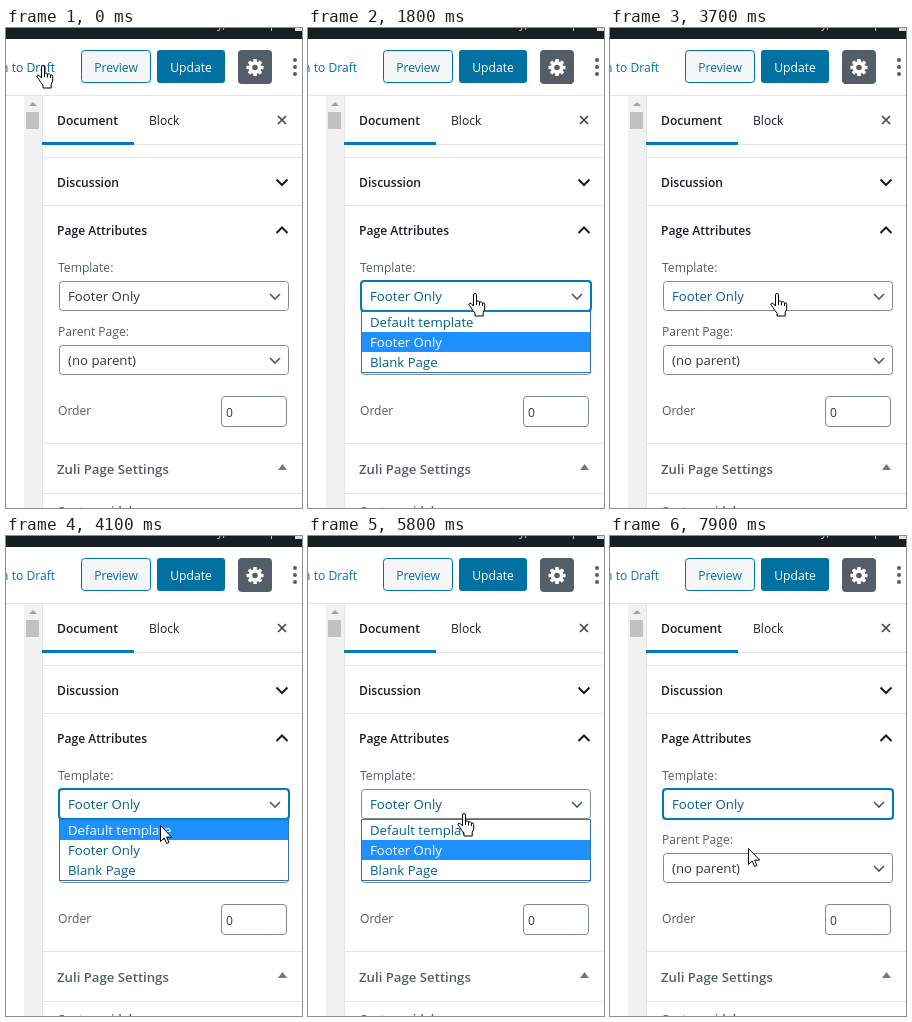
Write an HTML page that moves like this. It is 296 by 480 pixels and loops after 8 s.

```html
<!DOCTYPE html>
<html lang="en">
<head>
<meta charset="utf-8">
<title>Page settings panel</title>
<style>
  html, body { margin: 0; width: 100%; height: 100%; overflow: hidden; background: #fff; }
  svg { display: block; width: 296px; height: 480px; }
  text { font: 12.1px "Open Sans", "Noto Sans", sans-serif; fill: #191e23; white-space: pre; }
  .bold { font-weight: 600; }
  .big { font-size: 13.2px; }
  .label { fill: #555d66; }
  .value { fill: #32373c; }
  .field { fill: #fff; stroke: #7e8993; }
  .rule { stroke: #e2e4e7; }
  .chevron { fill: none; stroke: #191e23; stroke-width: 2; }
  .small { stroke: #555d66; stroke-width: 1.7; }
  .cursor { fill: #fff; stroke: #000; stroke-linejoin: round; }
</style>
</head>
<body>
<svg viewBox="0 0 296 480">
  <rect width="296" height="480" fill="#fff"/>

  <!-- header -->
  <rect width="296" height="11" fill="#191e23"/>
  <text x="211" y="0" style="fill:#ccc">y,</text>
  <text x="264" y="0" style="fill:#ccc">p</text>
  <rect x="289" width="7" height="3" fill="#ddd"/>
  <text id="draft" x="49" y="44" text-anchor="end">Switch to Draft</text>
  <rect x="75.5" y="22.5" width="69" height="32" rx="3" fill="#f3f5f6" stroke="#0071a1"/>
  <text x="110" y="44" text-anchor="middle" style="fill:#0071a1">Preview</text>
  <rect x="151" y="22" width="68" height="33" rx="3" fill="#0071a1"/>
  <text x="185" y="44" text-anchor="middle" style="fill:#fff">Update</text>
  <rect x="232" y="22" width="34" height="34" rx="4" fill="#555d66"/>
  <g id="gear" transform="translate(249 39.5)" fill="#fff"></g>
  <g fill="#555d66">
    <circle cx="289" cy="32" r="2"/><circle cx="289" cy="39" r="2"/><circle cx="289" cy="46" r="2"/>
  </g>

  <!-- page scrollbar -->
  <rect x="18" y="67" width="18" height="413" fill="#f1f1f1"/>
  <path d="M23 78l4-4 4 4z" fill="#a3a3a3"/>
  <rect x="20" y="84" width="13" height="17" fill="#c1c1c1"/>
  <path class="rule" d="M0 67.5H296M36.5 67V480M36 116.5H296M36 129.5H296M36 177.5H296M36 415.5H296M36 465.5H296"/>

  <!-- tabs -->
  <rect x="36" y="114" width="92" height="3" fill="#007cba"/>
  <text class="bold" x="51" y="97">Document</text>
  <text x="143" y="97">Block</text>
  <path d="M272 88l8 8m0-8l-8 8" stroke="#40464d" stroke-width="1.7"/>

  <!-- sections -->
  <text class="bold" x="51" y="159">Discussion</text>
  <path class="chevron" d="M270.5 151.5l5.5 5.5 5.5-5.5"/>
  <text class="bold" x="51" y="207">Page Attributes</text>
  <path class="chevron" d="M270.5 205l5.5-5.5 5.5 5.5"/>

  <text class="label" x="52" y="244">Template:</text>
  <rect id="select" x="53.5" y="253.5" width="229" height="29" rx="3" class="field"/>
  <rect id="ring" x="53" y="253" width="230" height="30" rx="3" fill="none" stroke="#007cba" stroke-width="2"/>
  <text id="choice" class="big" x="62" y="273">Footer Only</text>
  <path class="chevron small" d="M264 266l5 5 5-5"/>

  <text class="label" x="52" y="308">Parent Page:</text>
  <rect x="53.5" y="317.5" width="229" height="29" rx="3" class="field"/>
  <text class="big value" x="62" y="337">(no parent)</text>
  <path class="chevron small" d="M264 330l5 5 5-5"/>

  <text class="label" x="52" y="387">Order</text>
  <rect x="215.5" y="368.5" width="65" height="30" rx="3.5" class="field"/>
  <text class="value" x="220" y="389">0</text>

  <text class="bold big label" x="51" y="446">Zuli Page Settings</text>
  <path d="M272 442l4.5-6 4.5 6z" fill="#72777c"/>
  <text class="bold label" x="51" y="488">Custom sidebar</text>

  <g id="list">
    <rect x="53.5" y="283.5" width="229" height="61" fill="#fff" stroke="#2f74b5"/>
    <rect id="mark" x="54" width="228" height="20" fill="#1e90ff"/>
  </g>

  <g id="arrow" class="cursor">
    <path d="M.5 .5V16.5L4.2 13 6.7 18.5 9 17.5 6.6 12.1H11.7Z"/>
  </g>
  <g id="hand" class="cursor">
    <path d="M5.5 2a1.5 1.5 0 0 1 3 0V8.2q2.5-1 3 .8q2.3-.8 3 .8q2.2-.3 2.2 1.8V15q0 2-1.5 4V23H7V20Q4.5 17.5 3 14.5Q1 12 .8 11Q1.5 9.2 3.5 10.8L5.5 13Z"/>
    <path d="M8.5 8.2V12M11.5 9V12.5M14.5 10V13" fill="none"/>
  </g>
</svg>
<script>
const NS = 'http://www.w3.org/2000/svg';
const LOOP = 8000, STEP = 100;
const $ = id => document.getElementById(id);

function add(parent, tag, attrs, text = '') {
  const el = document.createElementNS(NS, tag);
  for (const name in attrs) el.setAttribute(name, attrs[name]);
  el.textContent = text;
  parent.append(el);
  return el;
}

for (let i = 0; i < 8; i++) {
  add($('gear'), 'rect', { x: -1.8, y: -8.5, width: 3.6, height: 4.5, rx: .6, transform: `rotate(${i * 45})` });
}
add($('gear'), 'circle', { r: 6.3 });
add($('gear'), 'circle', { r: 2.8, fill: '#555d66' });

const options = ['Default template', 'Footer Only', 'Blank Page'].map((name, i) =>
  add($('list'), 'text', { class: 'big', x: 62, y: 299 + i * 20 }, name));

// time, cursor, left, top, glide to the next key
const path = [
  [0, 'hand', 30, 37], [100, 'hand', 31, 41],
  [200, 'arrow', 38, 62, true], [900, 'arrow', 40, 266],
  [1000, 'hand', 85, 275], [1100, 'hand', 132, 278, true], [1500, 'hand', 160, 265],
  [4100, 'arrow', 154, 289], [4200, 'arrow', 142, 321], [4300, 'arrow', 134, 312],
  [4500, 'arrow', 137, 313],
  [5300, 'arrow', 141, 303], [5400, 'arrow', 149, 287], [5500, 'hand', 149, 277],
  [5900, 'hand', 150, 275],
  [6100, 'arrow', 149, 287], [6200, 'arrow', 139, 300], [6300, 'arrow', 134, 309],
  [6500, 'arrow', 128, 316], [6800, 'arrow', 137, 313],
  [7600, 'hand', 132, 321], [7700, 'hand', 132, 320], [7900, 'arrow', 138, 312],
];
const openSpans = [[1700, 3000], [3800, 4800], [5800, 6800]];
const pressSpans = [[3100, 3200], [3700, 3900], [5700, 5900]];
const focusAt = 1600;

const within = (t, spans) => spans.some(([a, b]) => t >= a && t < b);
const show = (el, on) => { el.style.display = on ? '' : 'none'; };

function cursorAt(t) {
  const i = path.findLastIndex(key => key[0] <= t);
  let [start, kind, x, y, glide] = path[i];
  if (glide) {
    const [end, , nx, ny] = path[i + 1];
    const u = (t - start) / (end - start), e = u * u * (3 - 2 * u);
    x += (nx - x) * e;
    y += (ny - y) * e;
  }
  return { kind, x: Math.round(x), y: Math.round(y) };
}

function draw(time) {
  const t = Math.floor(time % LOOP / STEP) * STEP;
  const { kind, x, y } = cursorAt(t);
  for (const name of ['arrow', 'hand']) {
    show($(name), name === kind);
    $(name).setAttribute('transform', `translate(${x} ${y})`);
  }

  const focused = t >= focusAt;
  show($('ring'), focused && !within(t, pressSpans));
  $('choice').style.fill = focused ? '#016087' : '#32373c';
  $('draft').style.fill = t < 200 ? '#006799' : '#0073aa';

  show($('list'), within(t, openSpans));
  const row = kind === 'arrow' && y >= 284 ? Math.min(2, Math.floor((y - 284) / 20)) : 1;
  $('mark').setAttribute('y', 284 + row * 20);
  options.forEach((el, i) => { el.style.fill = i === row ? '#fff' : '#016087'; });
}

let begin;
function tick(now) {
  begin ??= now;
  draw(now - begin);
  requestAnimationFrame(tick);
}
draw(0);
requestAnimationFrame(tick);
</script>
</body>
</html>
```
